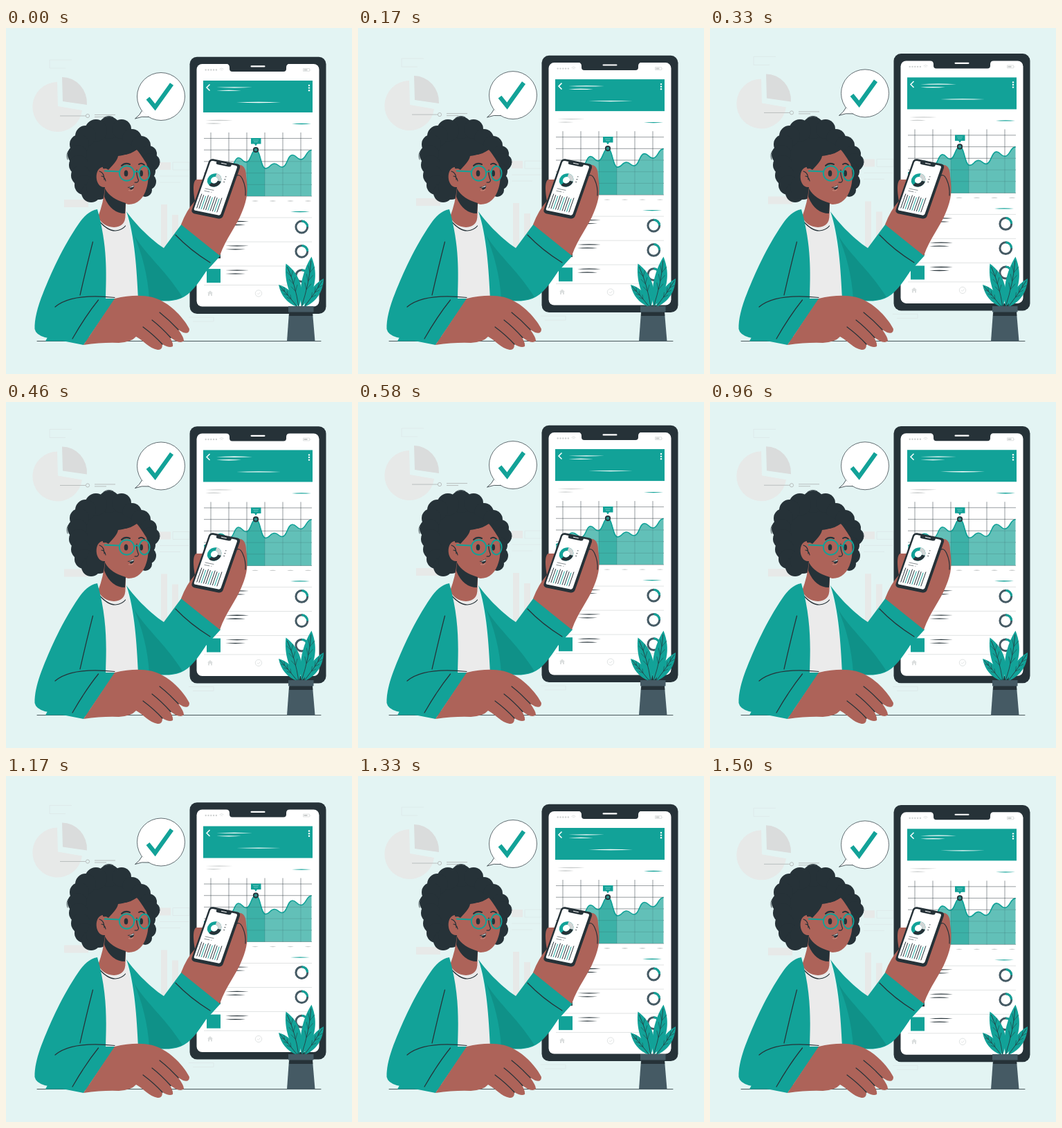
Write an HTML page that moves like this. It is 500 px wide and 500 px high and loops after 1.54 s.

```html
<!DOCTYPE html>
<html lang="en">
<head>
<meta charset="utf-8">
<title>Floating dashboard</title>
<style>
html, body { margin: 0; height: 100%; overflow: hidden; background: #e3f4f3; }
svg { display: block; width: 100%; height: 100%; }
.ink { fill: #263238; }
.teal { fill: #12a298; }
.skin { fill: #ad6359; }
.slate { fill: #455a64; }
.pale { fill: #e7e9e8; }
.line, .hairline { fill: none; stroke: #263238; stroke-width: 1.2; stroke-linecap: round; stroke-linejoin: round; }
.hairline { stroke-width: .8; }
.thin { fill: none; stroke: #263238; stroke-width: .5; }
.faint { fill: none; stroke: #dce8e7; stroke-width: .8; }
.grey { fill: none; stroke: #d9dcdc; stroke-width: .8; }
.white { fill: none; stroke: #fff; stroke-width: .9; }
.glasses { fill: none; stroke: #12a298; stroke-width: 1.9; }
</style>
</head>
<body>
<svg viewBox="0 0 500 500">
  <g class="float">
    <path class="faint" d="M63 46h32M63 46v12h23"/>
    <path class="pale" d="M74 78A36 36 0 1 0 110 119L75 113Z"/>
    <path fill="#dadcdc" d="M81 71A36 38 0 0 1 117 111L82 106Z"/>
    <path fill="none" stroke="#b9bebe" d="M78 127H115.500M128 125.500H158M128 128.500H145"/>
    <circle cx="118" cy="127" r="2.600" fill="#e3f4f3" stroke="#b9bebe"/>
    <path class="pale" d="M84 248h35v11h-35zM222 194h16v11h-16zM224 255h9v70h-9zM240 270h9v55h-9z"/>
    <path class="faint" d="M241 194h24v11h-24zM222 214h42M222 223h30M264 418h36v6h-30"/>
  </g>
  <path class="hairline" d="M45 452.500H455"/>
  <g class="float">
    <circle cx="224" cy="99" r="34.500" fill="#fff" stroke="#263238" stroke-width=".7"/>
    <path d="M196.500 119.500Q193.500 126 186.500 131Q196 127 206.500 128.500" fill="#fff" stroke="#263238" stroke-width=".8"/>
    <path d="M205 101.500L215.500 114.500L239.500 81" fill="none" stroke="#12a298" stroke-width="6.200"/>
    <rect class="ink" x="265.500" y="41.700" width="197" height="371.300" rx="10.500"/>
    <rect x="275.500" y="52" width="177" height="350.500" rx="8" fill="#fff"/>
    <path class="ink" d="M318 51.500Q323 52 323 57V59Q323 63 327 63H401Q405 63 405 59V57Q405 52 410 51.500Z"/>
    <rect x="353.500" y="54.300" width="21" height="2.200" rx="1.100" fill="#fff"/>
    <g id="status" fill="#cfd2d2"></g>
    <path class="grey" d="M308.500 59.500Q311.500 56.500 314.500 59.500M310 61Q311.500 59.500 313 61M429.500 58.500h9v4h-9zM440 60v1.500"/>
    <path d="M430.500 59.500h5v2h-5z" fill="#c9cccc"/>
    <rect class="teal" x="285" y="76" width="158" height="46"/>
    <path d="M294.500 81.500L290 86L294.500 90.500" fill="none" stroke="#fff" stroke-width="1.500"/>
    <g id="menu" fill="#fff"></g>
    <path id="title" fill="#fff"/>
    <path id="note" fill="#c9cccc"/>
    <path id="link" class="teal"/>
    <path id="grid" class="thin" stroke-opacity=".7"/>
    <path id="area" fill="#62c0b8"/>
    <path d="M348 194C353 190 356 176.500 361 176.500C367 176.500 369 198 374 203V243H348Z" fill="#3cb1a7"/>
    <path id="curve" fill="none" stroke="#12a298" stroke-width="1.600"/>
    <path id="overlay" class="thin" stroke-opacity=".3"/>
    <path class="teal" d="M354 159h14.500v8.500h-5.500l-2 3l-2-3h-5z"/>
    <path class="white" stroke-opacity=".4" d="M357 162h8M358 164.500h6"/>
    <circle cx="361" cy="176" r="3.200" fill="#2c8f89" stroke="#263238" stroke-width="1.800"/>
    <path class="grey" d="M286 274H442M286 309H442M286 344H442M286 371.500H442"/>
    <g id="rows"></g>
    <path d="M291 383L295 379.500L299 383H298V387H296V384.500H294V387H292V383Z" fill="#dcdfdf"/>
    <circle class="grey" cx="365" cy="383.500" r="4.700"/>
    <path class="grey" d="M363 383.500L364.500 385L367.500 382"/>
  </g>
  <g id="plant"></g>
  <path class="slate" d="M409 411H443L446.500 452.500H406Z"/>
  <path class="ink" d="M409.500 410H443L443.300 416H409Z"/>
  <rect class="slate" x="408" y="402" width="36.500" height="8.500"/>
  <g id="hair" class="ink"></g>
  <path class="hairline" d="M89 190Q86 182 91 177M141 130Q148 125 155 129M219 201Q225 194 220 187M203 243Q210 240 210 235M100 225Q96 220 98 214"/>

  <path class="teal" d="M60 447L57 452.500H120V440Z"/>
  <path fill="#ebebeb" d="M133 274L174 266L198 395H140Z"/>
  <path class="skin" d="M148 205C154 198 161 192 162 185C172 184 182 180 189 176C194 181 199 190 203 196C207 207 206 224 203 232C199 246 190 255 177 255L173 254L172.500 270Q173 287 156 288Q140 287 133 273Q141 252 143 230C128 232 126 201 141 201Z"/>
  <path class="ink" d="M143 232Q151 247 173 253L172 268Q152 268 142 244Z"/>
  <path class="line" d="M133 277Q146 293 158 293Q168 292 172.500 286"/>
  <path class="line" d="M135 207Q142 209 142 219M138 214Q143 215 144 221"/>
  <path class="ink" d="M140 203Q152 206 162 183Q180 185 190 174L165 160L140 180Z"/>
  <path class="line" style="stroke-width:2" d="M167 199Q172 194 179 197M192 197Q196 194 200 198"/>
  <ellipse class="ink" cx="173.500" cy="210" rx="2.800" ry="4.500"/>
  <ellipse class="ink" cx="195.500" cy="210" rx="2.500" ry="4.500"/>
  <path class="line" d="M189 205Q188 212 191.500 220Q191 224 186 223"/>
  <path class="ink" d="M175 230Q181 230 185 226.500Q186 233 180 234Q180 231 175 230Z"/>
  <path d="M178 230.200Q182 229.500 184.500 227.500V229Q181 231 178 230.200Z" fill="#fff"/>
  <path d="M177 234.500Q181 236 184 233" fill="none" stroke="#c98679" stroke-width="1.200"/>
  <g class="glasses">
    <circle cx="174.500" cy="210" r="10.700"/>
    <ellipse cx="200" cy="210" rx="7.600" ry="10.500"/>
    <path d="M142 206.500L164 207.500M185 209Q189 205.500 192.500 209"/>
  </g>

  <path class="teal" d="M132 262C120 264 112 273 105 283C81 318 65 355 54 382C45 404 41 422 41.500 435Q43 443 56 447L112 458L158 391H144C145 355 147 315 132 262Z"/>
  <path class="teal" d="M174 265C182 277 205 303 228 318L254 283Q287 300 310 329L289 352C278 369 266 386 252 391C235 397 215 395 205 389L191 391C189 350 186 300 174 265Z"/>
  <path fill="#0f9188" d="M184 297C197 323 231 350 255 389Q232 398 207 391C205 359 197 326 184 297Z"/>
  <path class="line" d="M125.500 309Q117 342 107 386M71 403Q95 383 157 389.500M133.500 393Q115 416 96 449M245 299Q266 321 295 339"/>

  <path class="skin" d="M253 284Q261 263 273 250C269 227 272 220 275 219H283L335 198C345 196 347 207 347 214C350 235 349 247 341 266C333 287 318 303 309 329Q284 309 253 284Z"/>
  <path class="line" d="M330 216Q337 208 342 219Q347 230 346 242"/>
  <g transform="matrix(.98 .2 -.33 .945 294.500 188.300)">
    <rect class="ink" x="0" y="0" width="46" height="83.500" rx="5"/>
    <rect x="2.500" y="2.800" width="39.500" height="76" rx="3" fill="#fff"/>
    <path class="ink" d="M11 2H33V4Q33 6.500 30 6.500H14Q11 6.500 11 4Z"/>
    <path class="white" d="M18 3.500h8"/>
    <g fill="none" stroke-width="5">
      <circle cx="16.800" cy="29.800" r="7.500" stroke="#12a298"/>
      <path stroke="#263238" d="M24.300 29.800A7.500 7.500 0 0 1 13 36.300"/>
      <path stroke="#d2d6d6" d="M16.800 22.300A7.500 7.500 0 0 1 24.300 29.800"/>
    </g>
    <path d="M31 21v1.200M31 25v1.200M31 29v1.200" stroke="#263238" stroke-width="1.200"/>
    <path class="thin" d="M8 44.500h13M8 48h8M18 48h1"/>
    <g id="bars" stroke-width=".9"></g>
  </g>

  <path class="skin" d="M157 391C187 384 211 386 226 395C247 406 262 428 265 435Q265 443 256 440L249 436Q257 447 257 452Q253 456 245 452L237 447Q242 456 241 460Q236 463 226 457Q226 466 219 465C207 463 198 451 188 446Q181 454 163 455Q140 454 112 458Z"/>
  <path class="line" d="M222 411Q236 422 249 436M211 422Q224 432 238 447.500M198 432Q214 444 226 457"/>
</svg>
<script>
const $ = id => document.getElementById(id);
const list = (n, make) => Array.from({ length: n }, (_, i) => make(i)).join("");
const dot = (x, y, r) => `<circle cx="${x}" cy="${y}" r="${r}"/>`;
const path = (id, d) => $(id).setAttribute("d", d);

// a stroke that thins out towards both ends
const taper = (x1, x2, y) => `M${x1} ${y}Q${(x1 + x2) / 2} ${y - 1.3} ${x2} ${y}Q${(x1 + x2) / 2} ${y + 1.3} ${x1} ${y}Z`;

$("status").innerHTML = list(5, i => dot(288.7 + i * 3.8, 60.5, 1.2));
$("menu").innerHTML = list(3, i => dot(438, 83 + i * 3.6, 1.2));
path("title", taper(304, 356, 85.8) + taper(304, 340, 90.3) + taper(333, 397, 107.5));
path("note", taper(288, 328, 133.5) + taper(288, 312, 138) + list(6, i => taper(304 + i * 25.5, 314 + i * 25.5, 250)));
path("link", taper(413, 441, 138.5) + taper(411, 439, 265.5));

const gridLines = list(6, i => `M286 ${159.5 + i * 16.7}H442M${296 + i * 26} 151V243`);
path("grid", gridLines);
path("overlay", gridLines);

// chart extremes, joined by flat-ended curves
const peaks = [[286, 214], [296, 207], [310, 197], [323, 203], [336, 187.5], [347, 194],
  [361, 176.5], [375, 203], [388, 196], [399, 201], [414, 183.5], [426, 190], [441.5, 176.5]];
const curve = peaks.map(([x, y], i) => {
  if (!i) return `M${x} ${y}`;
  const [px, py] = peaks[i - 1], mid = (x + px) / 2;
  return `C${mid} ${py} ${mid} ${y} ${x} ${y}`;
}).join("");
path("curve", curve);
path("area", curve + "V243H286Z");

$("rows").innerHTML = list(3, i => {
  const y = 287.5 + i * 35.3;
  return `<rect x="290" y="${y - 10}" width="20" height="20" class="${i == 1 ? "ink" : "teal"}"/>
    <path class="ink" d="${taper(317, 351, y - 8) + taper(317, 346, y - 3)}"/>
    <circle cx="427.300" cy="${y}" r="8.400" fill="none" stroke="#455a64" stroke-width="3"/>
    <path d="M427.300 ${y - 8.4}a8.400 8.400 0 0 1 8.400 8.400" fill="none" stroke="#12a298" stroke-width="3"/>`;
});

$("bars").innerHTML = list(10, i =>
  `<path d="M${6 + i * 3.3} ${53 + i % 3}V75" stroke="${i % 3 == 2 ? "#12a298" : "#263238"}"/>`);

const curls = [[149, 144, 16], [167, 146, 14], [182, 160, 14], [195, 170, 14], [206, 182, 12],
  [209, 194, 13], [204, 207, 12], [205, 222, 12], [201, 234, 10], [130, 148, 16], [115, 156, 15],
  [106, 168, 14], [103, 183, 14], [105, 198, 14], [108, 213, 14], [113, 227, 14], [123, 238, 14], [134, 230, 18]];
$("hair").innerHTML = '<ellipse cx="151" cy="188" rx="48" ry="46"/><ellipse cx="196" cy="200" rx="17" ry="32"/>' +
  curls.map(c => dot(...c)).join("");

// base, tip and bulge to the left and right of the chord
function leaf(x, y, tx, ty, left, right) {
  const dx = tx - x, dy = ty - y, len = Math.hypot(dx, dy);
  const at = (u, v) => `${(x + dx * u - dy / len * v).toFixed(1)} ${(y + dy * u + dx / len * v).toFixed(1)}`;
  const bend = (right - left) / 2;
  const veins = list(3, i => {
    const u = .35 + i * .17;
    return [left + bend, -right + bend].map(w => `M${at(u, bend * .8)}L${at(u + .13, bend - w * .5)}`).join("");
  });
  return `<path class="teal" d="M${x} ${y}C${at(.3, right * 1.3)} ${at(.68, right * 1.3)} ${tx} ${ty}C${at(.68, -left * 1.3)} ${at(.3, -left * 1.3)} ${x} ${y}Z"/>
    <path class="hairline" d="M${x} ${y}Q${at(.5, bend * 1.8)} ${at(.92, bend * .2)}"/>
    <path class="thin" d="${veins}"/>`;
}
$("plant").innerHTML = leaf(421, 403, 394, 371, 6, 7) + leaf(423, 403, 404.5, 340.5, 7, 12) +
  leaf(431, 403, 459, 362, 6, 8) + leaf(427, 403, 441.5, 330.5, 7, 12);

const floats = document.querySelectorAll(".float");
const wave = n => Math.cos(2 * Math.PI * (n - 17.2) / 40);

function draw(ms) {
  const step = Math.floor((ms % 1540 + 5) * .024);
  const y = -4.45 * (wave(step) - wave(0));
  floats.forEach(g => g.setAttribute("transform", `translate(0 ${y.toFixed(2)})`));
}

let start;
function tick(now) {
  start ??= now;
  draw(now - start);
  requestAnimationFrame(tick);
}
draw(0);
requestAnimationFrame(tick);
</script>
</body>
</html>
```
